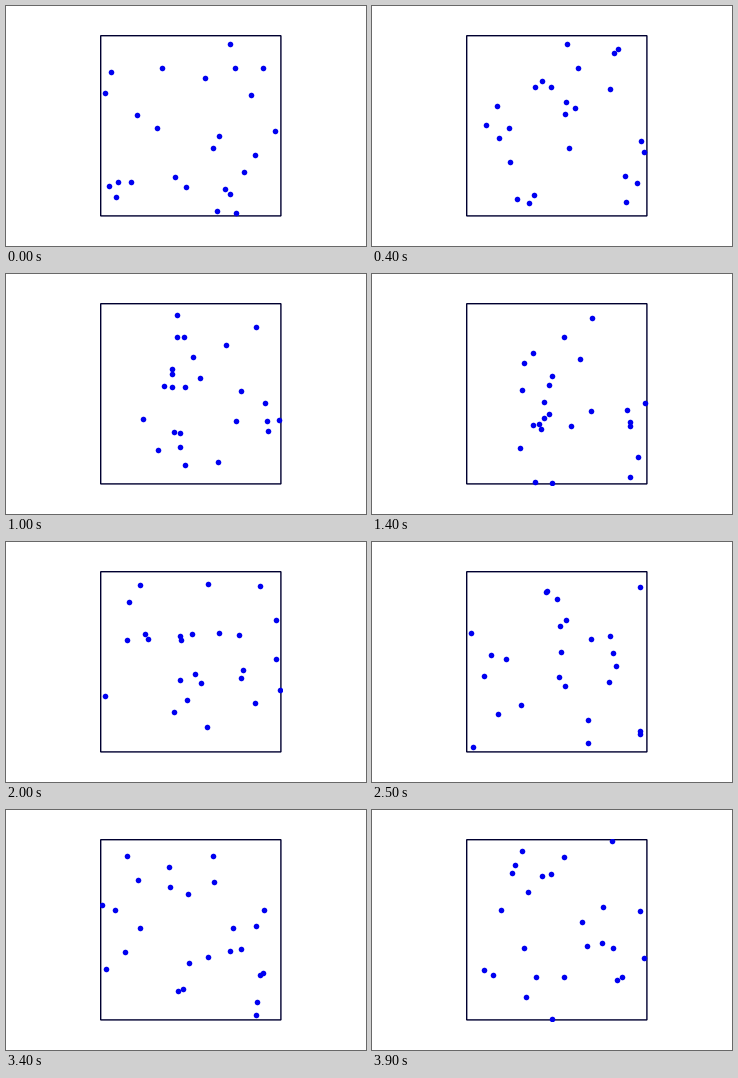
A matplotlib script that plays this animation: 360 px wide and 240 px high, repeating every 4 s.

```python
import numpy as np
import matplotlib.pyplot as plt
from matplotlib.animation import FuncAnimation
from matplotlib.patches import Rectangle

W, H, DPI = 360, 240, 100
FRAMES, INTERVAL = 40, 100
PX = 72 / DPI  # points per pixel

LEFT, TOP, SIDE = 94.7, 29.7, 180.2
LOW = np.array([96.0, 30.5])
HIGH = np.array([274.0, 210.0])
GRAVITY = np.array([0, 4.41])  # pixels per frame squared
SUBSTEPS = 60

# x, y, vx, vy in pixels and pixels per frame
PARTICLES = np.array([
    (224, 38, -4.5, -2.82), (156, 62, 1.5, 22.93), (229, 62, 3.25, -12.57),
    (257, 62, -2.75, -13.57), (105, 66, 8.25, 13.68), (199, 72, -0.5, 8.68),
    (99, 87, 3.75, -0.82), (245, 89, 6.75, 5.43), (131, 109, 3.5, 12.18),
    (151, 122, 1.5, 9.93), (269, 125, -1, 4.18), (213, 130, -4.5, -31.82),
    (207, 142, -3.25, -20.32), (249, 149, 1.25, 2.93), (238, 166, 3.75, 16.07),
    (169, 171, 0.25, -32.82), (180, 181, -0.25, -33.82), (103, 180, 5.5, -28.82),
    (112, 176, 6.25, -22.32), (125, 176, 9.5, -32.57), (110, 191, 4.25, -23.57),
    (219, 183, -4, -29.07), (224, 188, 11.25, -22.07), (211, 205, -4.5, -33.07),
    (230, 207, 2, -39.82),
])


def simulate():
    """Positions of all particles per frame, bouncing elastically off the walls."""
    pos, vel = PARTICLES[:, :2].copy(), PARTICLES[:, 2:].copy()
    dt = 1 / SUBSTEPS
    path = [pos.copy()]
    for _ in range(FRAMES - 1):
        for _ in range(SUBSTEPS):
            pos += vel * dt + GRAVITY * dt * dt / 2
            vel += GRAVITY * dt
            for wall, out in ((LOW, pos < LOW), (HIGH, pos > HIGH)):
                pos = np.where(out, 2 * wall - pos, pos)
                vel = np.where(out, -vel, vel)
        path.append(pos.copy())
    return path


path = simulate()

fig = plt.figure(figsize=(W / DPI, H / DPI), dpi=DPI, facecolor="white")
ax = fig.add_axes([0, 0, 1, 1])
ax.set_xlim(0, W)
ax.set_ylim(H, 0)
ax.axis("off")

box = Rectangle((LEFT, TOP), SIDE, SIDE, fill=False, ec="#000030",
                lw=1.4 * PX, snap=False, zorder=1)
ax.add_patch(box)
dots, = ax.plot([], [], "o", color="#0000f0", ms=5.6 * PX, mew=0, zorder=2)
clip = Rectangle((LEFT - 0.7, TOP - 0.7), SIDE + 1.4, SIDE + 1.4,
                 transform=ax.transData)
dots.set_clip_path(clip)


def draw(i):
    dots.set_data(path[i][:, 0], path[i][:, 1])
    return dots,


anim = FuncAnimation(fig, draw, frames=FRAMES, interval=INTERVAL,
                     repeat=True, repeat_delay=0)
plt.show()
```
